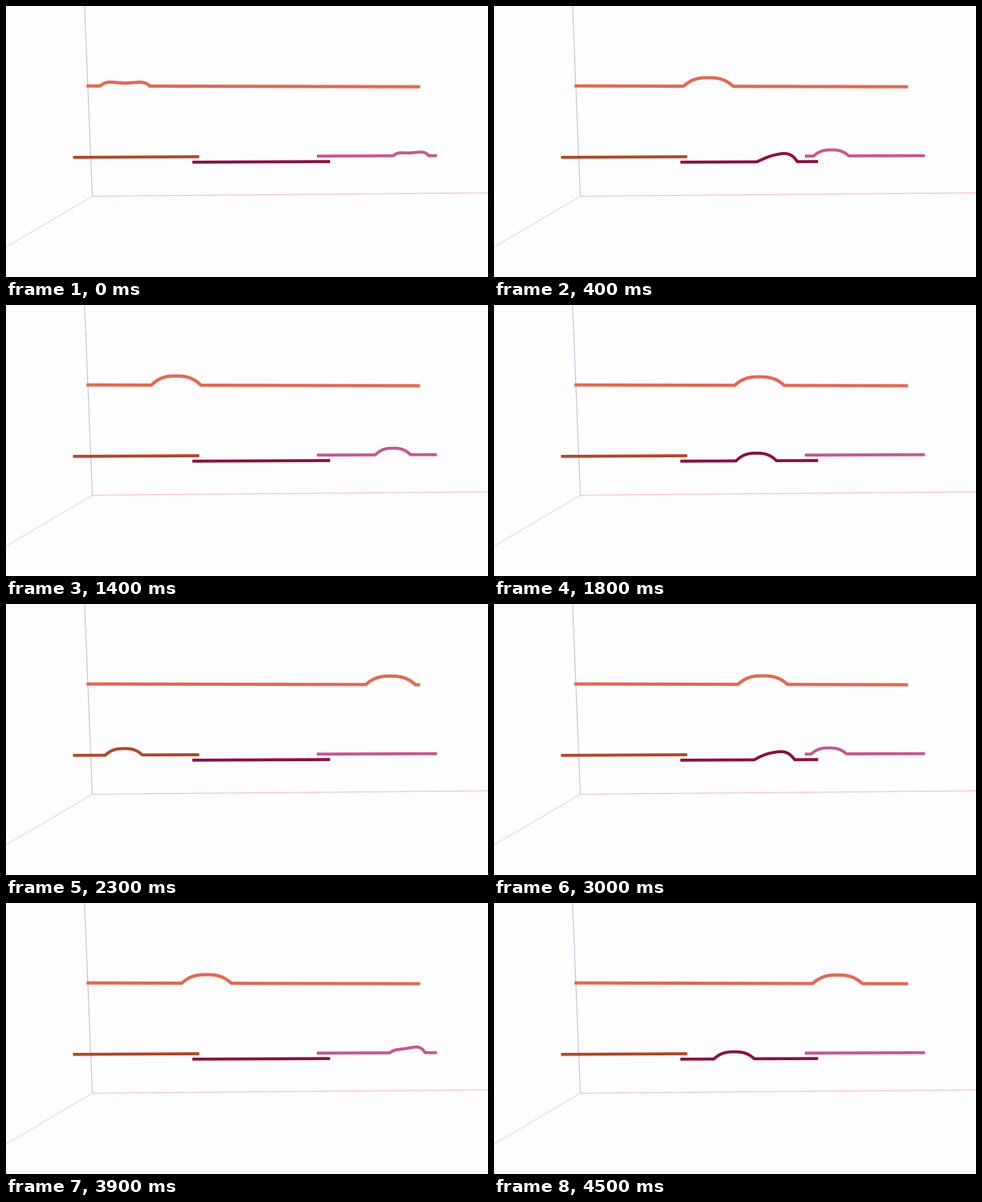
These frames come from a looping animation (600x338 px, 4600 ms). A matplotlib script:

```python
import numpy as np
import matplotlib.pyplot as plt
from matplotlib.animation import FuncAnimation

W, H, DPI = 600, 338, 100
FRAMES, STEP = 46, 100
PX = 72 / DPI


class Rail:
    """A straight bar with a pulse running from its start to its end.

    Times are in steps: span is the time to cross the full bar, life the
    visible part of each period, lead the head start given to the pulse.
    """

    def __init__(self, start, end, color, width, phase,
                 span=7.08, period=12.93, life=5, lead=0.96):
        self.start, self.end = np.array(start), np.array(end)
        self.color, self.width, self.phase = color, width, phase
        self.period, self.life, self.lead = period, life, lead
        self.speed = (end[0] - start[0]) / span
        self.half = 1.04 * abs(self.speed)
        self.amp = 0.36 * abs(self.speed)
        self.u = np.linspace(0, 1, 1200)

    def points(self, t):
        x, y = (self.start + np.outer(self.u, self.end - self.start)).T
        age = (t - self.phase) % self.period
        if age < self.life:
            center = self.start[0] + self.speed * (age + self.lead)
            s = (x - center) / self.half * np.sign(self.speed)
            y = y - self.amp * pulse(s, age)
        return x, y


def ease(u):
    u = np.clip(u, 0, 1)
    return u * u * (3 - 2 * u)


def hump(age, a, b):
    """Half a sine wave between ages a and b, zero elsewhere."""
    return np.sin(np.pi * np.clip((age - a) / (b - a), 0, 1))


def pulse(s, age):
    """Height from tail (s = -1) to head (s = 1): swells, tilts back, settles."""
    arch = np.maximum(1 - np.abs(s) ** 2.7, 0)
    level = ease(age / 1.2) * (1 + 0.1 * np.exp(-(age - 2) ** 2))
    tilt = 0.62 * hump(age, 0.5, 1.6)
    cup = 0.75 * hump(age, 0, 1.15)
    return arch * (level - tilt * s + cup * s * s)


RAILS = [
    Rail((100.2, 99.7), (515.5, 100.7), "#e6664f", 4.0, -0.47,
         span=14, period=11.86, life=11.86, lead=1.15),
    Rail((240.5, 188.0), (83.5, 188.8), "#b34424", 3.7, 6.8),
    Rail((403.5, 194.0), (232, 194.8), "#8e0c40", 3.7, 2.85),
    Rail((536.5, 186.7), (387, 187.2), "#c8558f", 3.7, -0.57),
]

fig = plt.figure(figsize=(W / DPI, H / DPI), dpi=DPI, facecolor="#fefdfe")
ax = fig.add_axes([0, 0, 1, 1])
ax.set_xlim(0, W)
ax.set_ylim(H, 0)
ax.axis("off")

ORIGIN = (107.5, 237.3)
AXES = [((97.8, 0), "#c2c2e6"), ((600, 233), "#f5bebe"), ((0, 300.7), "#c2f1c2")]
for end, color in AXES:
    ax.plot(*zip(ORIGIN, end), color=color, lw=1.1 * PX)
ax.plot([0, W], [337.5, 337.5], color="#f3f3f3", lw=PX)

lines = [ax.plot([], [], color=r.color, lw=r.width * PX,
                 solid_capstyle="butt", solid_joinstyle="round")[0]
         for r in RAILS]


def update(i):
    for line, rail in zip(lines, RAILS):
        line.set_data(*rail.points(i))
    return lines


anim = FuncAnimation(fig, update, frames=FRAMES, interval=STEP,
                     repeat=True, repeat_delay=0, blit=False)
plt.show()
```
